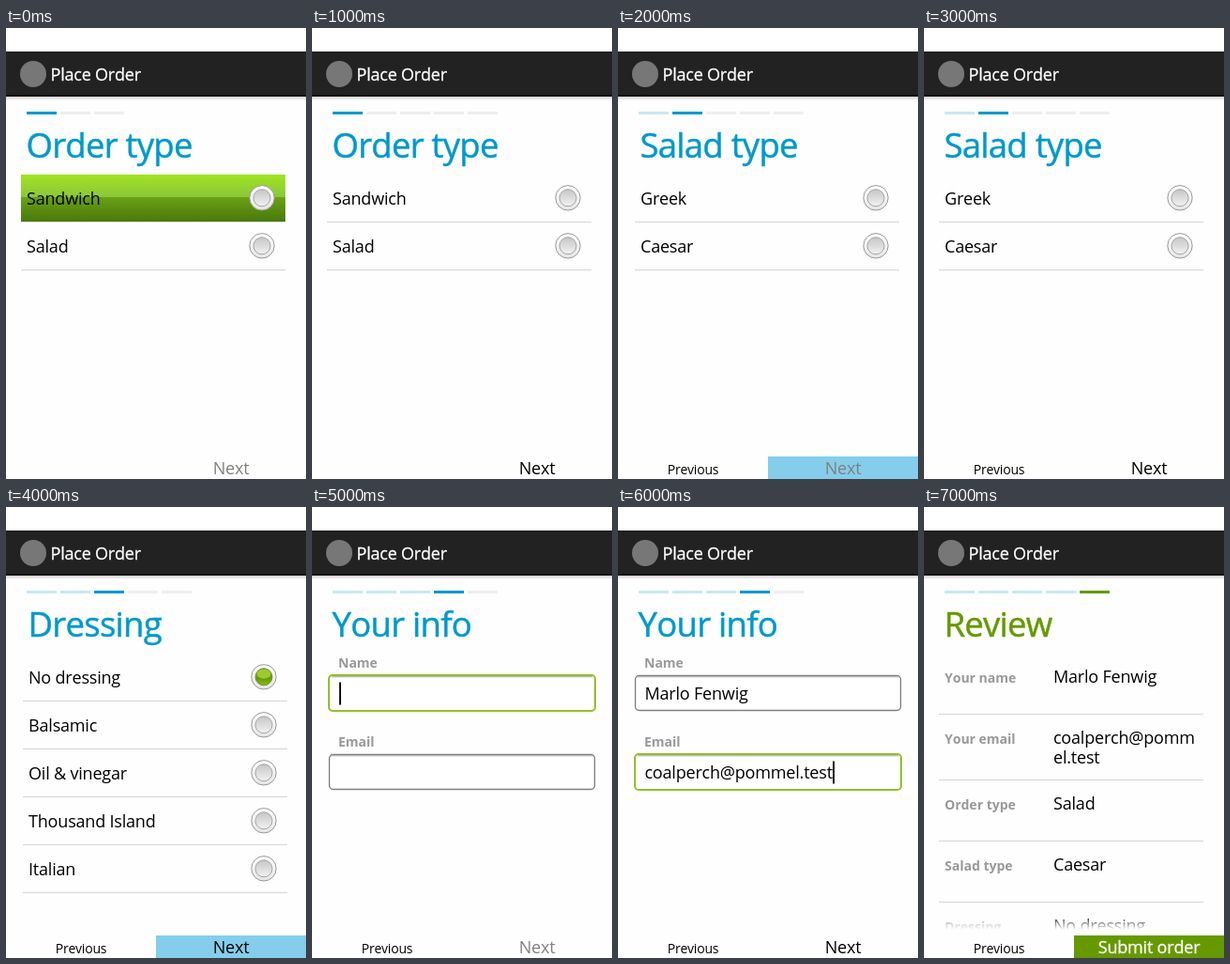
Write an HTML page that moves like this. It is 320 by 480 pixels and loops after 8 s.

```html
<!DOCTYPE html>
<html lang="en">
<head>
<meta charset="utf-8">
<title>Order wizard</title>
<style>
  html, body { margin: 0; width: 100%; height: 100%; overflow: hidden; background: #fff; }
  svg { display: block; width: 320px; height: 480px; }
  text {
    font-family: "Open Sans", "Noto Sans", sans-serif; font-size: 18px;
    letter-spacing: -.2px; font-kerning: none; white-space: pre;
  }
  .title { font-size: 36.5px; letter-spacing: -.75px; stroke-width: .5px; }
  .light { fill: #fff; stroke: #fff; stroke-width: .3px; }
  .label { font-size: 14px; font-weight: 700; letter-spacing: 0; fill: #999; }
  .small { font-size: 14px; }
</style>
</head>
<body>
<svg viewBox="0 0 320 480">
  <defs>
    <linearGradient id="shadow" x2="0" y2="1">
      <stop stop-color="#d2cdcf"/><stop offset="1" stop-color="#fefefe"/>
    </linearGradient>
    <linearGradient id="pressed" x2="0" y2="1">
      <stop stop-color="#9fe51f"/><stop offset=".48" stop-color="#8cc63c"/>
      <stop offset=".48" stop-color="#6ba214"/><stop offset="1" stop-color="#47780b"/>
    </linearGradient>
    <linearGradient id="dial" x2="0" y2="1">
      <stop stop-color="#fff"/><stop offset="1" stop-color="#e6e6e6"/>
    </linearGradient>
    <linearGradient id="off" x2="0" y2="1">
      <stop stop-color="#c6c6c6"/><stop offset="1" stop-color="#f2f2f2"/>
    </linearGradient>
    <linearGradient id="on" x2="0" y2="1">
      <stop stop-color="#6a9c10"/><stop offset=".6" stop-color="#669c06"/>
      <stop offset="1" stop-color="#86bd14"/>
    </linearGradient>
    <linearGradient id="fade" x2="0" y2="1">
      <stop stop-color="#fefefe" stop-opacity="0"/><stop offset="1" stop-color="#fefefe"/>
    </linearGradient>
  </defs>
  <rect width="320" height="480" fill="#fefefe"/>
  <rect width="320" height="25" fill="#fff"/>
  <rect y="25" width="320" height="48" fill="#222"/>
  <rect y="71" width="320" height="2" fill="#111"/>
  <rect y="73" width="320" height="4" fill="url(#shadow)"/>
  <circle cx="29" cy="49" r="14" fill="#777"/>
  <text x="47.5" y="56" class="light">Place Order</text>
  <g id="page"></g>
</svg>
<script>
const BLUE = '#0099cc', GREEN = '#669900', GRAY = '#808080';
const NAME = 'Marlo Fenwig', EMAIL = ['coalperch@pomm', 'el.test'];

const rect = (x, y, w, h, fill, extra = '') =>
  `<rect x="${x}" y="${y}" width="${w}" height="${h}" fill="${fill}" ${extra}/>`;
const text = (x, y, content, extra = '') =>
  `<text x="${x}" y="${y}" ${extra}>${content}</text>`;
const centered = (x, content, fill, cls = '') =>
  text(x, 475, content, `text-anchor="middle" fill="${fill}" class="${cls}"`);
const divider = y => rect(16, y, 282, 1, '#d5d5d5');

function steps(count, current) {
  const color = i => i < current ? '#c9e8f2' : i > current ? '#eee'
    : current === 4 ? GREEN : BLUE;
  return Array.from({ length: count }, (_, i) => rect(22 + 36 * i, 89, 32, 3, color(i))).join('');
}

function radio(y, on) {
  const gloss = `<ellipse cx="273" cy="${y - 3}" rx="7.5" ry="5" fill="#9bcb2f"/>`;
  return `<circle cx="273" cy="${y}" r="13.2" fill="url(#dial)" stroke="#999"/>
    <circle cx="273" cy="${y}" r="9" fill="url(#${on ? 'on' : 'off'})" stroke="${on ? '#70952b' : '#a5a5a5'}"/>`
    + (on ? gloss : '');
}

function choices(items, { selected = -1, pressed = -1 } = {}) {
  return items.map((item, i) => {
    const top = 156 + 51 * i;
    return divider(top + 50)
      + (i === pressed ? rect(16, top, 282, 50, 'url(#pressed)') : '')
      + text(22, top + 32, item) + radio(top + 24.8, i === selected);
  }).join('');
}

function field(label, y, value, focused) {
  const box = focused
    ? rect(18, y, 284, 38, '#fff', 'rx="4" stroke="#91c127" stroke-width="2"')
    : rect(18.5, y + .5, 283, 37, '#fff', 'rx="4" stroke="#808080" stroke-width="1.4"');
  const caret = focused ? rect(value ? 229 : 29, y + 7.5, 2, 24, '#111') : '';
  return text(28, y - 8, label, 'class="label"') + box
    + rect(21, y + 1, 278, 1, '#bbb') + rect(20, y + 2, 280, 1, '#e6e6e6')
    + text(28.5, y + 26, value) + caret;
}

function review() {
  const row = (y, label, ...lines) => text(22, y, label, 'class="label"')
    + lines.map((line, i) => text(138, y + 21 * i, line)).join('');
  return row(187, 'Your name', NAME) + row(252, 'Your email', ...EMAIL)
    + row(322, 'Order type', 'Salad') + row(387, 'Salad type', 'Caesar')
    + row(452, 'Dressing', 'No dressing')
    + [220, 290, 355, 420].map(divider).join('')
    + rect(0, 434, 320, 16, 'url(#fade)') + rect(0, 450, 320, 30, '#fefefe');
}

function page({ title, step, count = 5, body, shift = 0, next = '#000', pressed = false }) {
  const last = step === 4;
  const accent = last ? GREEN : BLUE;
  const button = last ? GREEN : pressed ? '#84ceeb' : 'none';
  return steps(count, step)
    + `<g transform="translate(${shift})">`
    + text(21.5, 138, title, `class="title" fill="${accent}" stroke="${accent}"`) + body + '</g>'
    + (step ? centered(80, 'Previous', '#000', 'small') : '')
    + rect(160, 456, 160, 24, button)
    + (last ? centered(240, 'Submit order', '#fff', 'light') : centered(240, 'Next', next));
}

const orders = ['Sandwich', 'Salad'], salads = ['Greek', 'Caesar'];
const dressings = ['No dressing', 'Balsamic', 'Oil &amp; vinegar', 'Thousand Island', 'Italian'];
const info = (name, email) =>
  field('Name', 179, name, !name) + field('Email', 263, email, !!name);

const scenes = [
  { title: 'Order type', step: 0, count: 3, body: choices(orders, { pressed: 0 }), next: GRAY },
  { title: 'Order type', step: 0, body: choices(orders) },
  { title: 'Salad type', step: 1, body: choices(salads), shift: 2, next: GRAY, pressed: true },
  { title: 'Salad type', step: 1, body: choices(salads) },
  { title: 'Dressing', step: 2, body: choices(dressings, { selected: 0 }), shift: 2, pressed: true },
  { title: 'Your info', step: 3, body: info('', ''), next: GRAY },
  { title: 'Your info', step: 3, body: info(NAME, EMAIL.join('')) },
  { title: 'Review', step: 4, body: review() },
].map(page);

const SCENE_MS = 1000;
const holder = document.getElementById('page');
const start = performance.now();
let shown = -1;

function draw() {
  const index = Math.floor((performance.now() - start) / SCENE_MS) % scenes.length;
  if (index !== shown) holder.innerHTML = scenes[shown = index];
  requestAnimationFrame(draw);
}
draw();
</script>
</body>
</html>
```
